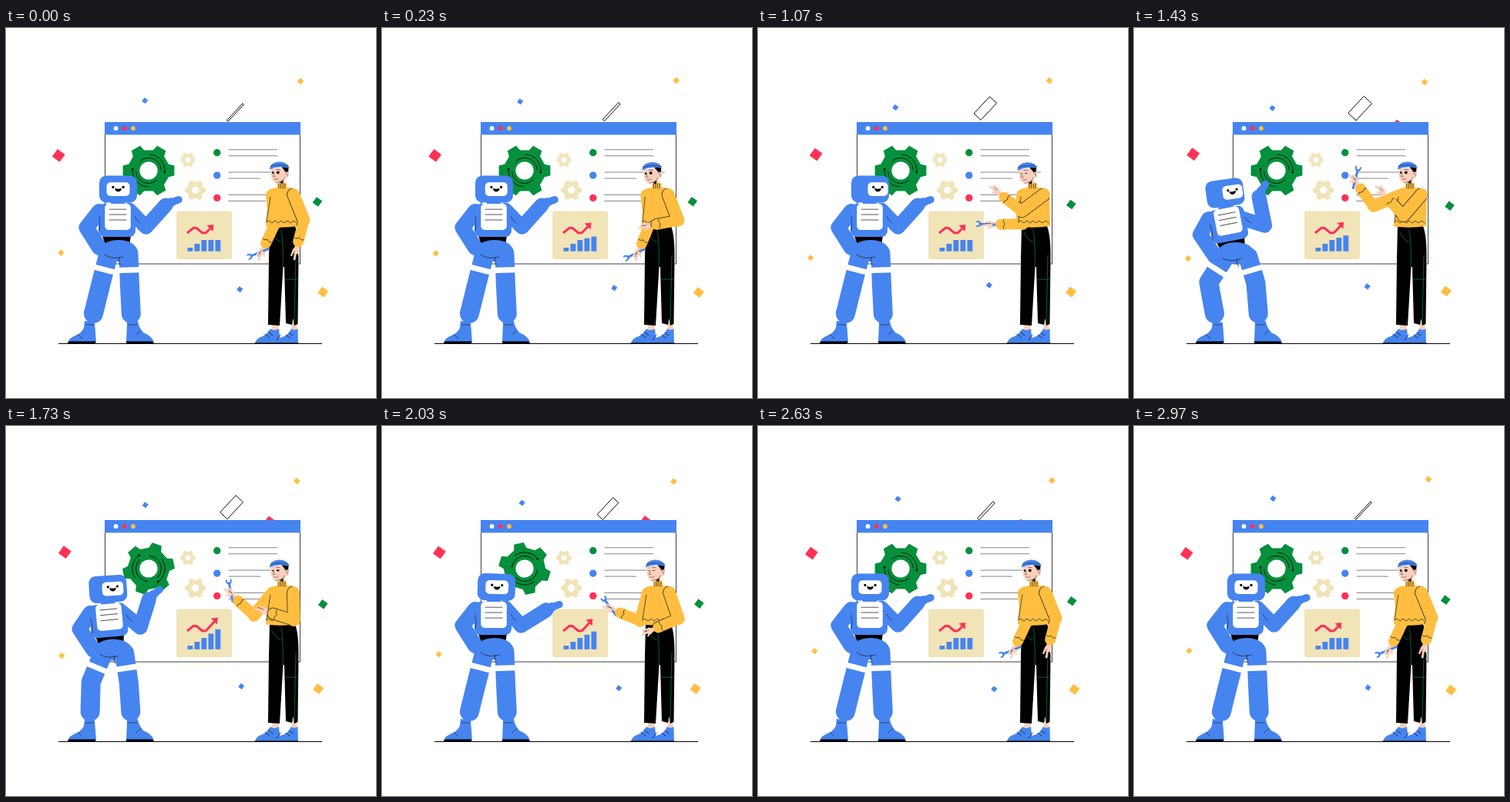
An HTML page with a canvas that plays this animation: 480x480 px, repeating every 3000 ms.

```html
<!DOCTYPE html>
<html lang="en">
<head>
<meta charset="utf-8">
<title>Robot and engineer</title>
<style>
html, body { margin: 0; width: 100%; height: 100%; overflow: hidden; background: #fff; }
canvas { display: block; width: 480px; height: 480px; }
</style>
</head>
<body>
<canvas id="stage" width="480" height="480"></canvas>
<script>
const c = document.getElementById('stage').getContext('2d');
const LOOP = 3000, DEG = Math.PI / 180;
const BLUE = '#4684f0', RED = '#ff3155', GREEN = '#068f3c', YELLOW = '#ffbe40',
      BEIGE = '#f0e4b8', SKIN = '#fccfbb', BLACK = '#000', INK = '#1d1d1d', WHITE = '#fff';
let now = 0;

// Timing
const smooth = u => u * u * (3 - 2 * u);
const ease = (from, to) => smooth(Math.min(1, Math.max(0, (now - from) / (to - from))));
const pulse = (from, to) => now > from && now < to ? Math.sin(Math.PI * (now - from) / (to - from)) ** 2 : 0;
const sway = (mid, size, peak) => mid + size * Math.cos((now - peak) / LOOP * 2 * Math.PI);

// Geometry
const mix = (a, b, u) => a + (b - a) * u;
const mixPt = (a, b, u) => [mix(a[0], b[0], u), mix(a[1], b[1], u)];
const angle = (a, b) => Math.atan2(b[1] - a[1], b[0] - a[0]);
const polar = (p, r, a) => [p[0] + r * Math.cos(a), p[1] + r * Math.sin(a)];

// Elbow of a two-bone arm; side chooses the bend
function bend(shoulder, hand, upper, lower, side) {
  const reach = Math.hypot(hand[0] - shoulder[0], hand[1] - shoulder[1]);
  const cos = (upper * upper + reach * reach - lower * lower) / (2 * upper * reach);
  return polar(shoulder, upper, angle(shoulder, hand) + side * Math.acos(Math.max(-1, Math.min(1, cos))));
}

// Drawing
function fill(color, path) {
  c.fillStyle = color;
  c.fill(new Path2D(path));
}
function ink(path, width = .8, color = INK) {
  c.strokeStyle = color; c.lineWidth = width;
  c.stroke(new Path2D(path));
}
function line(color, width, ...pts) {
  c.strokeStyle = color; c.lineWidth = width;
  c.beginPath();
  pts.forEach(p => c.lineTo(p[0], p[1]));
  c.stroke();
}
function dot(color, x, y, r, ry = r) {
  c.fillStyle = color;
  c.beginPath(); c.ellipse(x, y, r, ry, 0, 0, 7); c.fill();
}
function box(color, x, y, w, h, r = 0) {
  c.fillStyle = color;
  c.beginPath(); c.roundRect(x, y, w, h, r); c.fill();
}
function place([x, y], turn, draw) {
  c.save();
  c.translate(x, y); c.rotate(turn);
  draw();
  c.restore();
}
function square(color, size, x, y) {
  place([x, y], 36 * DEG, () => box(color, -size / 2, -size / 2, size, size));
}

function confetti() {
  square(RED, 12, sway(72.5, 4.3, 1500), sway(164.6, .9, 100));
  square(BLUE, 5.8, sway(180, 2, 2300), sway(99, 5, 1350));
  square(YELLOW, 6.2, sway(379.5, 2.5, 0), sway(69.7, 2.3, 2100));
  square(GREEN, 9, sway(407, 4.5, 1900), sway(228.3, 3, 1700));
  square(YELLOW, 5.8, sway(71, 3.2, 2300), sway(295.2, 3.7, 1400));
  square(YELLOW, 10, sway(408, 3.2, 0), sway(342, 1.2, 500));
  square(BLUE, 5.8, sway(303.3, 4.4, 2250), sway(337.5, 4, 2450));
}

function gear(color, x, y, r, hole, turn) {
  place([x, y], turn, () => {
    c.fillStyle = color;
    c.beginPath();
    for (let i = 0; i < 6; i++)
      for (const [da, k] of [[-.31, .8], [-.19, 1], [.19, 1], [.31, .8]]) {
        const [px, py] = polar([0, 0], r * k, i * Math.PI / 3 + da);
        c.lineTo(px, py);
      }
    c.closePath(); c.fill();
    dot(WHITE, 0, 0, hole);
  });
}

function gears() {
  const turn = Math.PI * ease(1430, 2310);
  gear(GREEN, 185, 185, 34, 11.6, turn);
  place([185, 185], turn, () => {
    for (let i = 0; i < 2; i++) {
      c.rotate(Math.PI);
      c.strokeStyle = BLACK; c.lineWidth = .8;
      c.beginPath(); c.arc(0, 0, 21, -1.5, .1); c.stroke();
      c.beginPath(); c.arc(0, 0, 16.5, .8, 3.1); c.stroke();
      dot(BLACK, 20.9, 2, 1.3);
    }
  });
  gear(BEIGE, 236, 171, 10, 3.4, 0);
  gear(BEIGE, 245.7, 210.3, 13.8, 4.7, 0);
}

function card() {
  box(BEIGE, 221, 237.5, 72, 62.5, 3);
  const grow = pulse(0, 1070) + pulse(1070, 2500);
  for (let i = 0; i < 5; i++) {
    const top = Math.max(275, 285 - i * 5) - grow * Math.max(0, i - 2) * 5.7;
    box(BLUE, 235.5 + i * 9, top, 6.8, 289.7 - top);
  }
  const x = 268.5 + 5.5 * grow, y = 256 - 6.5 * grow;
  c.lineJoin = 'round';
  line(RED, 3, [235, 266], [243, 259.3], [247, 259.5], [255, 266], [259.5, 265.5], [x - 2, y + 2.5]);
  fill(RED, `M${x - 8} ${y} L${x + .8} ${y - 1} L${x} ${y + 8}Z`);
}

function board() {
  square(RED, 11, 342, sway(128.8, 5, 450));
  box(WHITE, 128.5, 122, 253, 184);
  ink('M128.5 138V306H381.5V138', .75, BLACK);
  box(BLUE, 128, 122, 254, 16.5);
  [WHITE, RED, YELLOW].forEach((color, i) => dot(color, 142.5 + i * 11.2, 130.2, 2.9));
  gears();
  [[GREEN, 352, 352], [BLUE, 367, 330], [RED, 367, 337]].forEach(([color, long, short], i) => {
    const y = 157.8 + i * 29.3;
    dot(color, 273.8, y + 4, 4.7);
    ink(`M288.5 ${y}H${long}M288.5 ${y + 8}H${short}`, .9, '#777');
  });
  card();
}

function plate() {
  const w = sway(8, 6, 1430);
  place([sway(295.2, 2.6, 250), sway(107, 3, 2750)], -47 * DEG, () => {
    c.fillStyle = WHITE; c.strokeStyle = BLACK; c.lineWidth = .9;
    c.beginPath(); c.rect(-15, -w / 2, 30, w); c.fill(); c.stroke();
  });
}

function leg(hip, knee, foot) {
  line(BLUE, 25, hip, knee, foot);
  place(mixPt(hip, knee, .5), angle(hip, knee), () => box(WHITE, -3.6, -13, 7.2, 26));
}

function robotHead(lean, settle) {
  const turn = ease(100, 480) - ease(1430, 2150);
  place([145.5 - 27.5 * lean + 3 * settle, 209 + 5 * lean], (2 * settle - 8 * lean) * DEG, () => {
    box(BLUE, -24.5, -17.5, 49, 35, 9);
    const w = 30 - 4 * turn;
    c.translate(10 * turn, 0);
    box(WHITE, -w / 2, -8.8, w, 17.8, 5);
    const e = w * .22;
    dot(BLACK, -e, -2.6, 1.6);
    dot(BLACK, e, -2.6, 1.6);
    fill(BLACK, 'M-4.2 -1.2Q0 .6 4.2 -1.2Q4 3.4 0 3.4Q-4 3.4 -4.2 -1.2Z');
  });
}

function robot() {
  const lean = ease(1080, 1430) - ease(1470, 1980), settle = pulse(1700, 2420);
  const p = (x, y, dx, dy) => [x + dx * lean, y + dy * lean];
  const tilt = -11 * DEG * lean, chest = p(145, 245, -23, 5.5);

  // Feet
  fill(BLUE, 'M102 380L115 382L117 408H80Q82 402 90 399Q98 396 101 389Z');
  fill(BLUE, 'M157 382L171 380Q172 388 178 395Q190 400 192 408H156Z');
  fill(BLACK, 'M80 410Q80 406.5 83 406.5H116V410ZM156 410V406.5H189Q192 407 192 410Z');
  ink('M93 397L99 403M175 392L169 398M103 385H114M158 385H170', .6);

  // Legs and hips
  place(chest, tilt, () => fill(BLACK, 'M-20 24H17L14 44H-14Z'));
  c.lineJoin = c.lineCap = 'round';
  leg(p(133, 293, -15, 4), p(122.5, 334, -25.5, -4), p(113.5, 370.5, -9, 0));
  leg(p(159, 293, -11, 4), p(160.5, 335, -2.5, -4), p(162.3, 370.5, -1, 0));
  const hips = p(146, 289, -14, 3);
  dot(BLUE, ...hips, 24, 14);
  place(hips, tilt / 2, () => ink('M-18 5Q-8 12 6 8M2 18Q-1 13 1 8', .7));

  // Arms
  line(BLUE, 20, p(121, 238, -24, 10), p(104.5, 259, -18.5, 9), p(121, 285, -16, 11));
  const shoulder = p(160, 236, -20, 11), wrist = p(207 + 6 * settle, 230 + 9 * settle, -45, -11);
  const aim = (-28 - 40 * lean) * DEG, palm = polar(wrist, 8, aim);
  line(BLUE, 19, shoulder, bend(shoulder, wrist, 31, 38, 1), wrist);
  line(BLUE, 12, wrist, palm);
  line(BLUE, 9.5, palm, polar(palm, 10.5, aim + .15));

  place(chest, tilt, () => {
    box(BLUE, -25, -17, 48, 43, 8);
    box(BLUE, -9, -24, 18, 12);
    box(WHITE, -16.7, -17, 33.5, 34, 5);
    ink('M-11 -9.8H11M-11 -3H11M-11 4H11', .9, '#444');
    ink('M-24 0Q-22 10 -24 19M22 -1Q24 5 29 8', .6);
  });
  robotHead(lean, settle);
}

// Engineer poses: wrench hand, free hand, wrench angle, head shift
const REST = { tool: [332, 290], free: [376, 289], aim: 158, shift: 0, shut: 0 };
const POSES = [
  { t: 0, ...REST },
  { t: 530, tool: [333, 292], free: [297, 210], aim: 148, shift: -10, shut: 0 },
  { t: 1070, tool: [303, 255], free: [310, 212], aim: 183, shift: -5, shut: 1 },
  { t: 1430, tool: [286.5, 199], free: [322, 213], aim: 284, shift: 0, shut: 0 },
  { t: 2030, tool: [298, 238], free: [347, 266], aim: 234, shift: 0, shut: 1 },
  { t: 2630, ...REST },
  { t: LOOP, ...REST }
];
function pose() {
  const i = POSES.findIndex(p => p.t > now), a = POSES[i - 1], b = POSES[i], u = ease(a.t, b.t);
  const num = k => mix(a[k], b[k], u);
  return { tool: mixPt(a.tool, b.tool, u), free: mixPt(a.free, b.free, u),
           aim: num('aim') * DEG, shift: num('shift'), shut: num('shut') };
}

function arm(shoulder, palm, upper, lower, clip, grip) {
  const elbow = bend(shoulder, palm, upper, lower, -1);
  const cuff = mixPt(elbow, palm, .7), a = angle(elbow, palm);
  c.lineCap = c.lineJoin = 'round';
  line(SKIN, 5.5, cuff, palm);
  dot(SKIN, ...palm, 4.4);
  grip();
  place(palm, a, () => {
    line(SKIN, 2.8, [0, 0], [11, -1]);
    line(SKIN, 2.4, [0, 3], [7, 4]);
    line(SKIN, 2, [0, -2], [4, -5]);
    ink('M1 1.5L8 1.8', .5);
  });
  if (clip) {
    c.save(); c.clip(clip);
    line(INK, 17.4, shoulder, elbow);
    line(INK, 15.4, elbow, cuff);
    c.restore();
  }
  line(YELLOW, 16, shoulder, elbow);
  line(YELLOW, 14, elbow, cuff);
  place(cuff, a, () => ink('M-4 -6Q-2 -4 -4 -2Q-6 0 -4 2Q-2 4 -4 6', .7));
}

function wrench(palm, aim) {
  place(palm, aim, () => {
    line(BLUE, 3, [-9, 0], [15, 0]);
    ink('M19 -3Q14 -3 15 0Q14 3 19 3', 2, BLUE);
  });
}

function face(shift, shut) {
  place([355 + shift, 188 - shift * .15], shift * .7 * DEG, () => {
    fill(BLACK, 'M3 -8H11.5Q12 -3 10 0L5 2Z');
    fill(SKIN, 'M-11 -6L-11.5 2Q-11 12 -4 12.5Q3 12 7 6L7 -2L4 -6Z');
    dot(SKIN, 9, 2.5, 3, 4);
    ink('M8 .5Q11 0 10 4M-7 0L-8.5 4.5H-6M-7 8Q-4 9 -2 7.5M-5 12.5Q3 12 7 6', .5);
    fill(BLACK, 'M0 12.5L5 9.5L4 14Z');
    dot(BLACK, -2.2, -.6, 1.9, 1.9 - 1.5 * shut);
    dot(BLACK, -8.8, -.4, 1.1, 1.5 - 1.1 * shut);
    ink('M-4.5 -4.5Q-2 -5.5 .5 -4.2', .5);
    fill(BLUE, 'M-13 -6Q-12 -14 0 -14.5Q11 -14 12.5 -6Q6 -8 0 -7.5Q-7 -7.5 -13 -4.5Z');
    ink('M-12 -8.5Q0 -12 12 -8.5', .6);
  });
}

function legsOfEngineer() {
  box(SKIN, 345, 382, 8, 12);
  box(SKIN, 370.5, 381, 7, 12);
  fill(BLUE, 'M323 409Q325 402 333 400Q339 397 343 390Q348 394 354 390L356 409Z');
  fill(BLUE, 'M350 409Q352 402 361 400Q367 397 370 390Q374 393 378.5 390L379 409Z');
  ink('M323 408.5H379M336 397L342 402M340 394L346 399M363 398L368 402M367 395L372 399M351 405L356 398', .8);
  fill(BLACK, 'M342 257H375Q380 270 379.5 300L378.5 384L374 386L372.5 377L371 385L363 383L361 310L359.5 310L355 386L340 385L341 300Z');
  ink('M357 262Q360 275 359 312M376 295L374 383M362 326H378M345 265Q350 276 357 278', .8, '#087a3b');
}

function engineer() {
  const { tool, free, aim, shift, shut } = pose();
  const dx = shift * .4;
  legsOfEngineer();
  arm([345 + dx, 217], tool, 37, 40, null, () => wrench(tool, aim));

  const torso = new Path2D(`M${341 + dx} 210Q${347 + dx} 207 ${353 + dx} 207H${366 + dx}Q${376 + dx} 207 ${380 + dx} 214L379 257Q358 260 337 257.5Z`);
  c.fillStyle = YELLOW; c.fill(torso);
  let hem = 'M337.5 252';
  for (let x = 341; x < 380; x += 4) hem += `L${x} ${x % 8 === 5 ? 250 : 253}`;
  ink(hem + `M${343 + dx} 219L338 251`, .7);

  line(SKIN, 8.5, [358 + shift, 196], [358 + dx, 205]);
  box(YELLOW, 352 + dx, 201, 12, 9, 1.5);
  for (let i = 0; i < 4; i++) ink(`M${354 + dx + i * 2.6} 202V208`, .7);
  face(shift, shut);
  arm([373 + dx, 216], free, 36, 41, torso, () => {});
}

function draw(time) {
  now = time % LOOP;
  c.lineCap = 'butt'; c.lineJoin = 'miter';
  c.fillStyle = WHITE;
  c.fillRect(0, 0, 480, 480);
  confetti();
  board();
  plate();
  ink('M68 409.5H410', 1, BLACK);
  robot();
  engineer();
}

const start = performance.now();
function frame() {
  draw(performance.now() - start);
  requestAnimationFrame(frame);
}
frame();
</script>
</body>
</html>
```
